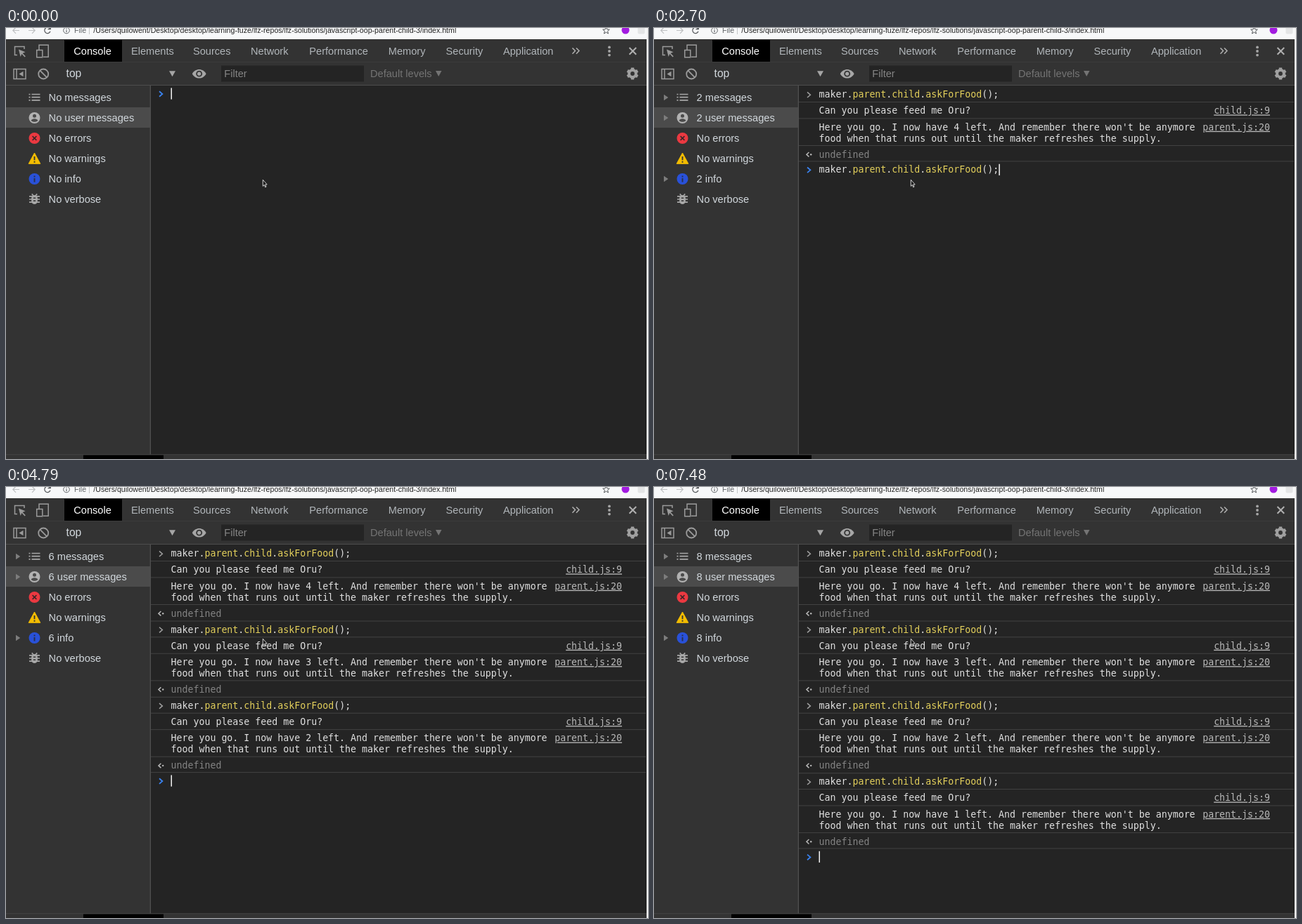
An HTML page for the animation above (8000 ms loop, 913 px wide and 614 px high).

```html
<!DOCTYPE html>
<html lang="en">
<head>
<meta charset="utf-8">
<title>Console session</title>
<style>
html, body { margin: 0; width: 100%; height: 100%; overflow: hidden; background: #242424; }
svg { display: block; width: 913px; height: 614px; }
text { white-space: pre; font: 14.6px "Liberation Sans", Arial, sans-serif; fill: #d2d8dd; }
.mono { font: 13.28px "DejaVu Sans Mono", monospace; fill: #e0e0e0; }
.prop { fill: #e2cf5b; }
.link { fill: #b8b8b8; text-anchor: end; text-decoration: underline; }
.dim { fill: #848484; }
.url { font-size: 10.62px; fill: #222; }
.tab { fill: #b1b6ba; }
</style>
</head>
<body>
<svg id="stage" viewBox="0 0 913 614" xmlns="http://www.w3.org/2000/svg">
  <rect width="913" height="614" fill="#242424"/>
  <!-- address bar -->
  <rect width="913" height="16" fill="#f7f8f9"/>
  <g fill="none" stroke="#bfc1c3" stroke-width="1.2">
    <path d="M19 3.5H10M14 -.8L9.8 3.5L14 7.8M32 3.5H41M37 -.8L41.2 3.5L37 7.8"/>
    <path d="M62.5 1A4.2 4.2 0 1 0 63 4.8M63.3 -2V1.6H59.5" stroke="#56595c"/>
    <circle cx="86" cy="3.5" r="4.3" stroke="#5f6367" stroke-width="1"/>
    <path d="M86 3V6M86 .8V2" stroke="#5f6367"/>
    <path d="M118.5 0V9" stroke="#c4c6c8" stroke-width="1"/>
    <path d="M853.5 -1.5L854.9 2L858.3 2.2L855.6 4.5L856.5 8L853.5 6.1L850.5 8L851.4 4.5L848.7 2.2L852.1 2Z" stroke="#55585b" stroke-width="1"/>
  </g>
  <text class="url" x="97" y="7" style="fill:#5f6367">File</text>
  <text class="url" x="124.3" y="7">/Users/quilowent/Desktop/desktop/learning-fuze/lfz-repos/lfz-solutions/javascript-oop-parent-child-3/index.html</text>
  <circle cx="881" cy="3" r="5.5" fill="#a21be0"/>
  <rect x="898.5" y="-2" width="10" height="10.5" rx="2" fill="#e4e5e6"/>
  <!-- toolbars -->
  <rect y="16" width="911" height="65" fill="#333"/>
  <rect y="48" width="911" height="1" fill="#3b3b3b"/>
  <rect y="81" width="911" height="1" fill="#4d4d4d"/>
  <rect x="83" y="17" width="82" height="31" fill="#000"/>
  <g id="tabs"></g>
  <g fill="none" stroke="#9b9b9b" stroke-width="1.5">
    <path d="M16 38.5H12.5V26.5H26V30"/>
    <path d="M18 30.5L27.5 34.3L23.6 35.9L27.8 40.2L26.6 41.4L22.4 37.1L20.6 41Z" fill="#9b9b9b" stroke="none"/>
    <path d="M47 31V24.3H60.2V41.2H53M43.7 31.5H51.8V41.7H43.7Z"/>
    <path d="M805.5 28.5L809.5 32.6L805.5 36.7M811 28.5L815 32.6L811 36.7" stroke="#b0b0b0"/>
    <path d="M886.5 28L896.2 37.7M896.2 28L886.5 37.7" stroke="#b0b0b0" stroke-width="2"/>
    <path d="M11 58.5H28V72.5H11ZM15 58.5V72.5"/>
    <path d="M24.5 61.8V69.2L18.5 65.5Z" fill="#9b9b9b" stroke="none"/>
    <circle cx="53.2" cy="65.5" r="7" stroke-width="1.8"/>
    <path d="M48.4 60.7L58 70.3" stroke-width="1.8"/>
  </g>
  <g fill="#a6a6a6">
    <circle cx="858" cy="27.4" r="1.9"/><circle cx="858" cy="33" r="1.9"/><circle cx="858" cy="38.6" r="1.9"/>
    <path d="M232 61.2H241L236.5 69.3Z"/>
    <path d="M264.8 65.2C269 56.8 280.4 56.8 284.6 65.2C280.4 73.6 269 73.6 264.8 65.2Z"/>
    <circle cx="274.7" cy="65.2" r="4.4" fill="#333"/><circle cx="274.7" cy="65.2" r="2.6"/>
    <path d="M611 61H619.5L615.2 69Z" fill="#747474"/>
    <g transform="translate(891 65)">
      <circle r="4.9" fill="none" stroke="#a0a0a0" stroke-width="4"/>
      <path id="gear" fill="none" stroke="#a0a0a0" stroke-width="4.4"/>
    </g>
  </g>
  <rect x="306" y="53.5" width="203" height="23" fill="#242424"/>
  <text x="85.6" y="70.4" style="font-size:15.6px">top</text>
  <text x="310.3" y="70.4" style="fill:#858585">Filter</text>
  <text x="518" y="70.4" style="fill:#747474">Default levels</text>
  <!-- sidebar -->
  <rect y="82" width="205" height="525.5" fill="#333"/>
  <rect y="113" width="205" height="29" fill="#4b4b4b"/>
  <rect x="204.7" y="82" width="1.3" height="525.5" fill="#505050"/>
  <path id="arrows" d="M14 94.7L20.3 99L14 103.3ZM14 123.7L20.3 128L14 132.3ZM14 210.7L20.3 215L14 219.3Z" fill="#7d7d7d"/>
  <path d="M32.5 94.5H34.5M32.5 98.7H34.5M32.5 102.9H34.5M36.5 94.5H48.5M36.5 98.7H48.5M36.5 102.9H48.5" stroke="#a8a8a8" stroke-width="1.7"/>
  <circle cx="40.5" cy="128" r="8" fill="#b2b2b2"/>
  <circle cx="40.5" cy="125.2" r="2.5" fill="#4b4b4b"/>
  <path d="M35.6 131.7C36.8 128.3 44.2 128.3 45.4 131.7C43.2 134.4 37.8 134.4 35.6 131.7Z" fill="#4b4b4b"/>
  <circle cx="40.5" cy="157" r="8" fill="#eb3941"/>
  <path d="M37.6 154.1L43.4 159.9M43.4 154.1L37.6 159.9" stroke="#3a2527" stroke-width="1.5"/>
  <path d="M40.5 178L48.8 193.3H32.2Z" fill="#f4bd00" stroke="#f4bd00" stroke-linejoin="round"/>
  <path d="M40.5 183V188.2M40.5 189.8V191.7" stroke="#333" stroke-width="1.8"/>
  <circle cx="40.5" cy="215" r="8" fill="#2951d9"/>
  <path d="M40.5 210.6V212.5M40.5 214V219.4" stroke="#26304f" stroke-width="1.9"/>
  <g fill="none" stroke="#a8a8a8" stroke-width="1.7">
    <path d="M33 239.8H48M33 244H48M33 248.2H48M36.8 236.4L39 239M44.2 236.4L42 239"/>
    <rect x="36.2" y="238" width="8.6" height="13" rx="4.3" fill="#a8a8a8" stroke="none"/>
    <path d="M38.8 242.2H42.2M38.8 246.2H42.2" stroke="#333" stroke-width="1.5"/>
  </g>
  <g id="labels"></g>
  <!-- console -->
  <g id="log"></g>
  <g id="prompt">
    <path d="M218 90.2L222.4 94L218 97.8" fill="none" stroke="#3a82ee" stroke-width="1.8"/>
    <text id="typed" class="mono" x="234.5" y="97.9"></text>
    <rect id="caret" y="85.4" width="1.5" height="16.2" fill="#f2f2f2"/>
  </g>
  <path d="M365.3 216.2V225.3L367.3 223.5L368.7 226.8L370 226.2L368.6 223H371.2Z" fill="#111" stroke="#e6e6e6" stroke-width=".9"/>
  <!-- window edges -->
  <rect y="607.5" width="911" height="1" fill="#555"/>
  <rect y="608.5" width="911" height="6" fill="#333"/>
  <rect x="110" y="608.5" width="114" height="6" fill="#000"/>
  <rect x="911" width="2" height="614" fill="#f4f4f4"/>
</svg>
<script>
const $ = id => document.getElementById(id);
const PITCH = 108.35, LOOP = 8000;
const COMMAND = 'maker.<tspan class="prop">parent</tspan>.<tspan class="prop">child</tspan>.<tspan class="prop">askForFood</tspan>();';

// Each state: start time, finished calls (0.5 = pending), command typed, caret shown.
const STATES = [
  [0, 0, 0, 1], [450, 0, 0, 0], [600, 0, 1, 1], [1200, 0, 1, 0],
  [1650, 0.5, 0, 0],
  [1800, 1, 0, 1], [2250, 1, 0, 0], [2700, 1, 1, 1],
  [3290, 2, 0, 1], [3740, 2, 0, 0], [4040, 2, 1, 1], [4640, 2, 1, 0],
  [4790, 3, 0, 1], [5240, 3, 0, 0], [5540, 3, 1, 1], [6130, 3, 1, 0],
  [6430, 4, 0, 1], [6880, 4, 0, 0], [7480, 4, 0, 1]
];

const text = (x, y, body, cls = '') => `<text class="${cls}" x="${x}" y="${y}">${body}</text>`;
const mono = (y, body, cls = '') => text(234.5, y, body, 'mono ' + cls);
const rule = y => `<rect x="206" y="${y}" width="704" height="1" fill="#424242"/>`;
const show = (id, on) => $(id).setAttribute('visibility', on ? 'visible' : 'hidden');

const TABS = [['Console', 96.3], ['Elements', 178], ['Sources', 266], ['Network', 348],
  ['Performance', 431.3], ['Memory', 543.8], ['Security', 625.6], ['Application', 707]];
$('tabs').innerHTML = TABS.map(([name, x], i) =>
  `<text class="${i ? 'tab' : ''}" x="${x}" y="38"${i ? '' : ' style="fill:#fff"'}>${name}</text>`).join('');

$('gear').setAttribute('d', Array.from({length: 6}, (_, i) => {
  const a = i * Math.PI / 3 + Math.PI / 6, c = Math.cos(a), s = Math.sin(a);
  return `M${c * 5} ${s * 5}L${c * 8.4} ${s * 8.4}`;
}).join(''));

function commandRow() {
  return '<path d="M218 91.4L222.4 95.2L218 99" fill="none" stroke="#a0a0a0" stroke-width="1.5"/>' + mono(99.2, COMMAND);
}

function callBlock(index, last) {
  return `<g transform="translate(0 ${index * PITCH})">` + commandRow() +
    rule(105) + mono(122.4, 'Can you please feed me Oru?') + text(876, 122.4, 'child.js:9', 'mono link') +
    rule(128.4) + mono(145.8, `Here you go. I now have ${4 - index} left. And remember there won't be anymore`) +
    text(876, 145.8, 'parent.js:20', 'mono link') +
    mono(161.5, "food when that runs out until the maker refreshes the supply.") +
    rule(167) + '<path d="M220.4 177L217 180.2L220.4 183.4" fill="none" stroke="#bbb" stroke-width="1.5"/>' +
    '<circle cx="223.2" cy="180.2" r="1.2" fill="#bbb"/>' + mono(184.6, 'undefined', 'dim') +
    rule(last ? 189.4 : 190.5) + '</g>';
}

function render(calls, typed, caret) {
  const pending = calls === 0.5, done = Math.floor(calls), count = Math.ceil(calls) * 2 || 'No';
  const labels = [`${count} messages`, `${count} user messages`, 'No errors', 'No warnings', `${count} info`, 'No verbose'];
  $('labels').innerHTML = labels.map((label, i) => text(60.6, 104.3 + i * 29, label)).join('');
  show('arrows', calls > 0);
  $('log').innerHTML = pending ? commandRow()
    : Array.from({length: done}, (_, i) => callBlock(i, i === done - 1)).join('');
  $('prompt').setAttribute('transform', `translate(0 ${done * PITCH})`);
  $('prompt').setAttribute('display', pending ? 'none' : 'inline');
  $('typed').innerHTML = typed ? COMMAND : '';
  $('caret').setAttribute('x', typed ? 490.4 : 234.5);
  show('caret', caret);
}

let current;
const start = performance.now();
function tick() {
  const t = (performance.now() - start) % LOOP;
  const state = STATES.findLast(([from]) => from <= t);
  if (state !== current) {
    current = state;
    render(...state.slice(1));
  }
  requestAnimationFrame(tick);
}
tick();
</script>
</body>
</html>
```
